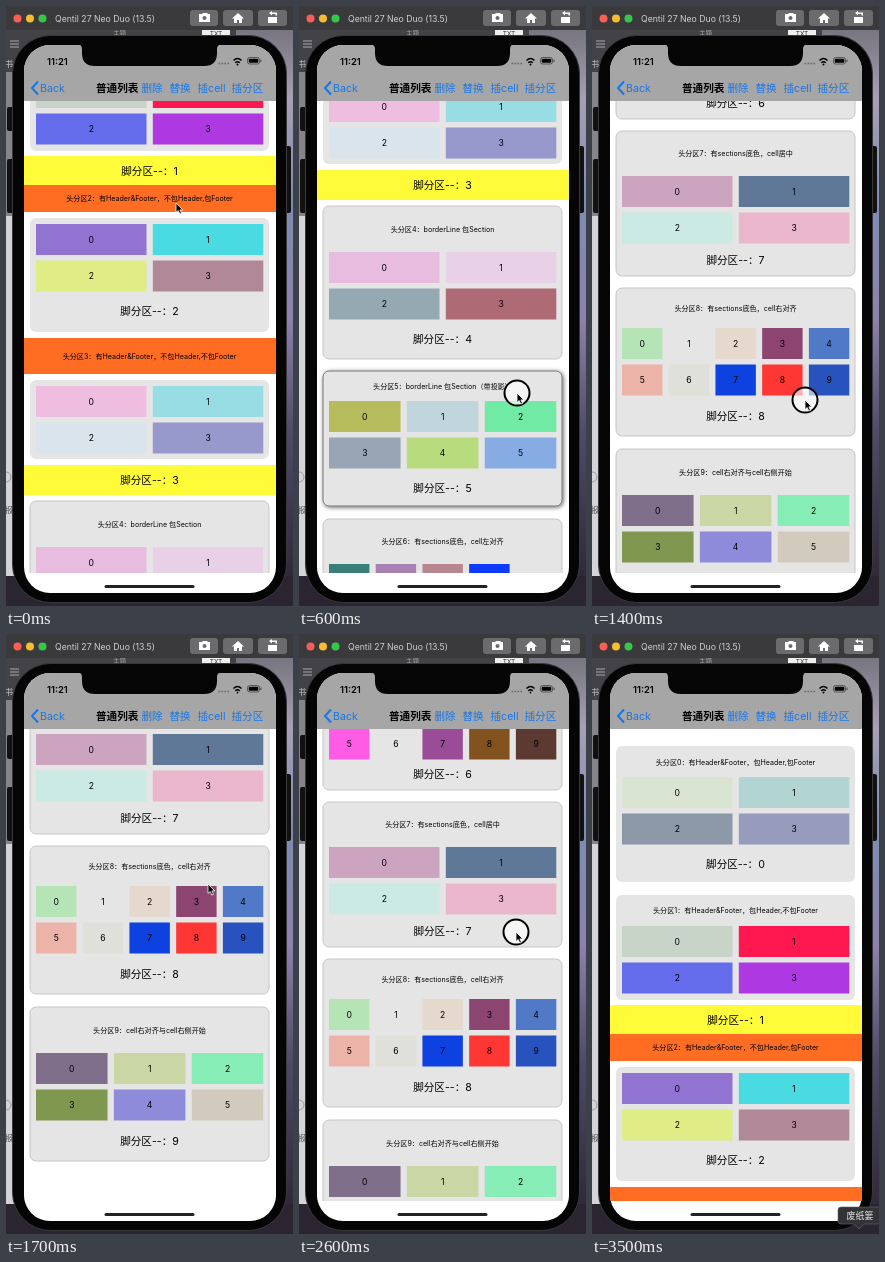
Animation, 287 px wide and 600 px high, one loop 3600 ms. Source, as an HTML page:

```html
<!DOCTYPE html>
<html lang="zh-CN">
<head>
<meta charset="utf-8">
<style>
html, body { margin: 0; width: 100%; height: 100%; overflow: hidden; background: #2a2530; }
svg { display: block; width: 287px; height: 600px; }
text { font-family: Inter, "Noto Sans CJK SC", "Noto Sans CJK", sans-serif; }
.mid { text-anchor: middle; }
.nav { font-size: 10.6px; fill: #1677ea; }
</style>
</head>
<body>
<svg viewBox="0 0 287 600">
  <defs>
    <clipPath id="screen"><rect x="18" y="39" width="252" height="548" rx="26"/></clipPath>
    <clipPath id="view"><rect x="18" y="95" width="252" height="472"/></clipPath>
    <linearGradient id="sky" x2="0" y2="1">
      <stop offset="0" stop-color="#77757f"/><stop offset=".12" stop-color="#a7a0b5"/>
      <stop offset=".3" stop-color="#7d8cb4"/><stop offset=".5" stop-color="#8c82ad"/>
      <stop offset=".7" stop-color="#4f4a69"/><stop offset="1" stop-color="#29232f"/>
    </linearGradient>
    <filter id="shadow" x="-10%" y="-10%" width="120%" height="120%">
      <feDropShadow dx="1" dy="1" stdDeviation="2" flood-opacity=".6"/>
    </filter>
  </defs>

  <!-- desktop behind the device -->
  <rect x="180" y="24" width="107" height="576" fill="url(#sky)"/>
  <rect y="24" width="230" height="546" fill="#d4d4d8"/>
  <rect y="24" width="230" height="42" fill="#434246"/>
  <rect y="66" width="10" height="144" fill="#858489"/>
  <rect y="570" width="287" height="30" fill="#2a2530"/>
  <path d="M4 35h9M4 38h9M4 41h9" stroke="#aaa"/>
  <text x="-1" y="61" font-size="8" fill="#ccc">书</text>
  <text x="-1" y="507" font-size="8" fill="#555">报</text>
  <circle cx="0" cy="471" r="5" fill="none" stroke="#999"/>
  <rect x="196" y="23" width="28" height="8" fill="#eee"/>
  <text class="mid" x="210" y="30" font-size="6.5" fill="#333">TXT</text>
  <text x="107" y="30" font-size="6.5" fill="#aaa">主题</text>

  <!-- simulator title bar -->
  <rect width="287" height="24" fill="#3a393c"/>
  <circle cx="11.5" cy="12.5" r="4" fill="#f95f57"/>
  <circle cx="24" cy="12.5" r="4" fill="#f5bd2f"/>
  <circle cx="36.5" cy="12.5" r="4" fill="#35c749"/>
  <text x="49" y="16" font-size="8.7" fill="#cfced0">Qentil 27 Neo Duo (13.5)</text>
  <g fill="#6b6a6d">
    <rect x="184" y="4" width="28" height="16" rx="3"/>
    <rect x="217" y="4" width="30" height="16" rx="3"/>
    <rect x="252" y="4" width="29" height="16" rx="3"/>
  </g>
  <g fill="#fff">
    <path d="M193 8h3l1-1h4l1 1h2v8h-11z"/>
    <path d="M226 12.5l6-5.5 6 5.5h-2v4.500h-3v-3h-2v3h-3v-4.500z"/>
    <path d="M262 11h9v6h-9zM263 7l3-2v1.500h5v3h-1.500v-1.500h-3.500v1.500z"/>
  </g>
  <circle cx="198.5" cy="12" r="2" fill="#6b6a6d"/>

  <!-- device -->
  <g fill="#111">
    <rect x="1" y="101" width="8" height="24" rx="2"/>
    <rect x="1" y="153" width="8" height="54" rx="2"/>
    <rect x="278" y="140" width="7" height="67" rx="2"/>
  </g>
  <rect x="6.5" y="29.5" width="274" height="567" rx="38" fill="#050505" stroke="#39383b"/>
  <g clip-path="url(#screen)">
    <rect x="18" y="39" width="252" height="548" fill="#fff"/>
    <g clip-path="url(#view)"><g id="list"></g></g>
    <rect x="18" y="39" width="252" height="56" fill="#a6a6a6"/>
  </g>
  <path d="M72 38q4 1 4 5v4q0 13 13 13h109q13 0 13-13v-4q0-4 4-5z" fill="#050505"/>
  <text x="41" y="59" font-size="9.4" font-weight="600">11:21</text>
  <path d="M212.500 57.500h11" stroke="#666" stroke-width="1.600" stroke-dasharray="1.6 1.4"/>
  <path d="M227.500 54.500q4-4 8 0M229.200 56.700q2.300-2 4.600 0" fill="none" stroke="#000" stroke-width="1.4"/>
  <circle cx="231.5" cy="58.4" r="1"/>
  <rect x="241.5" y="51.5" width="12" height="6.5" rx="2" fill="none" stroke="#444" stroke-width=".8"/>
  <rect x="242.7" y="52.7" width="9.6" height="4.1" rx="1"/>
  <path d="M255 53.500v2.500" stroke="#444"/>
  <path d="M32 75.500l-6 6.500 6 6.500" fill="none" stroke="#1677ea" stroke-width="2"/>
  <g class="nav">
    <text x="34" y="86">Back</text>
    <text x="90" y="86" font-weight="600" fill="#000">普通列表</text>
    <text x="135.5" y="86">删除</text>
    <text x="163.5" y="86">替换</text>
    <text x="191.5" y="86">插cell</text>
    <text x="225.5" y="86">插分区</text>
  </g>
  <rect x="98.5" y="579" width="90" height="3" rx="1.5" fill="#222"/>

  <g id="tip">
    <path d="M249 573h41v17h-18l-5 5-5-5h-13q-3 0-3-3v-11q0-3 3-3z" fill="#333236" stroke="#666" stroke-width=".6"/>
    <text x="254.5" y="585" font-size="9" fill="#eee">废纸篓</text>
  </g>
  <g id="cursor">
    <circle id="press" r="12.5" fill="#fff" fill-opacity=".6" stroke="#000" stroke-width="2"/>
    <path d="M0 0v9.500l2.200-2 1.600 3.600 1.700-.8-1.600-3.400h3z" stroke="#fff" stroke-width=".8"/>
  </g>
</svg>
<script>
const $ = id => document.getElementById(id);
const rect = (x, y, w, h, fill, extra = '') =>
  `<rect x="${x}" y="${y}" width="${w}" height="${h}" fill="${fill}" ${extra}/>`;
const label = (x, y, size, text) =>
  `<text class="mid" x="${x}" y="${y + size * 0.36}" font-size="${size}">${text}</text>`;

let list = '', count = 0;
const band = (top, h, fill) => { list += rect(18, top, 252, h, fill); };

// head, row and foot are measured from the top of the box
function section(top, height, head, row, foot, cols, title, colours) {
  const n = count++, gap = 6.3, w = (227.3 - gap * (cols - 1)) / cols;
  const edge = n < 4 ? '' : n === 5 ? 'stroke="#777" filter="url(#shadow)"' : 'stroke="#c6c6c6"';
  list += rect(24, top, 239, height, '#e5e5e5', 'rx="6" ' + edge);
  colours.split(' ').forEach((c, i) => {
    const x = 30 + i % cols * (w + gap), y = top + row + Math.floor(i / cols) * 36.5;
    list += rect(x, y, w, 31, '#' + c) + label(x + w / 2, y + 15.5, 8.6, i);
  });
  list += label(143.5, top + head, 7.1, `头分区${n}：${title}`) +
    label(143.5, top + foot, 10.6, `脚分区--：${n}`);
}

const yellow = '#fffb38', orange = '#ff6d22', both = '有Header&amp;Footer，', tinted = '有sections底色，';
band(371, 29, yellow);
band(400, 27, orange);
band(553, 36, orange);
band(680, 30, yellow);
section(112, 136, 16, 31, 118, 2, both + '包Header,包Footer', 'd9e5d1 b2d4d3 8b98a8 989cbc');
section(261, 105, 15, 31, 125, 2, both + '包Header,不包Footer', 'c7d4c7 ff184f 646ceb ae38e2');
section(433, 114, -20, 6, 93, 2, both + '不包Header,包Footer', '9174d1 4adae1 e0ec85 b18897');
section(595, 79, -24, 6, 100, 2, both + '不包Header,不包Footer', 'eebddf 98dde3 dae4ec 9798cc');
section(716, 153, 23, 46, 133, 2, 'borderLine 包Section', 'e8bcdf e8d0e6 95a9b2 af6b75');
section(881, 135, 15, 30, 117, 3, 'borderLine 包Section（带投影）', 'b6bb5c c1d6dc 71eaa5 98a5b5 b7db7d 86ace3');
section(1029, 143, 22, 45, 127, 5, tinted + 'cell左对齐', '3b7e79 a781b2 b8868f 0c3aff e5e5e5 ff5be4 e5e5e5 9b4c98 82531e 5c3a32');
section(1184, 145, 22, 45, 129, 2, tinted + 'cell居中', 'cda4c0 5f7897 cceae4 eab6cb');
section(1341, 148, 20, 40, 128, 5, tinted + 'cell右对齐', 'b5e5b7 e5e5e5 e5d8cc 8c4471 507ac8 ecb3a8 e0e0da 0e42e0 ff3734 2852be');
section(1502, 154, 23, 46, 134, 3, 'cell右对齐与cell右侧开始', '806f8b cad7a5 87edb6 7f974e 8f8bdb d2cbbd');
$('list').innerHTML = list;

// times in tenths of a second
const scrolls = [[0, 221], [1, 221], [2, 255], [4, 445], [5, 498], [6, 516], [8, 725], [10, 915],
  [12, 1012], [14, 1059], [16, 1145], [18, 1112], [20, 1100], [24, 1100], [26, 1016],
  [28, 640], [30, 308], [32, 100], [33, 40], [35, 0], [36, 0]];
const points = [[0, 170, 197], [2, 214, 420], [3, 218, 320], [5, 218, 404], [6, 218, 387],
  [7, 219, 303], [10, 214, 420], [12, 213, 441], [14, 213, 394], [16, 206, 275], [18, 198, 225],
  [20, 196, 220], [24, 216, 214], [26, 217, 298], [27, 220, 400], [30, 263, 579], [31, 272, 615], [36, 272, 615]];
const drags = [[2, 3], [6, 7], [13, 15], [24, 27]];

function at(track, t) {
  const i = track.findIndex(k => k[0] > t) - 1, a = track[i], b = track[i + 1];
  return a.map((v, j) => Math.round(v + (b[j] - v) * (t - a[0]) / (b[0] - a[0])));
}

function draw(now) {
  const t = Math.floor(now % 3600 / 100);
  const [, scroll] = at(scrolls, t), [, x, y] = at(points, t);
  $('list').setAttribute('transform', `translate(0 ${-scroll})`);
  $('cursor').setAttribute('transform', `translate(${x} ${y})`);
  $('press').style.display = drags.some(([a, b]) => t >= a && t <= b) ? '' : 'none';
  $('tip').style.display = t >= 30 ? '' : 'none';
}
const start = performance.now();
function tick() {
  draw(performance.now() - start);
  requestAnimationFrame(tick);
}
tick();
</script>
</body>
</html>
```
